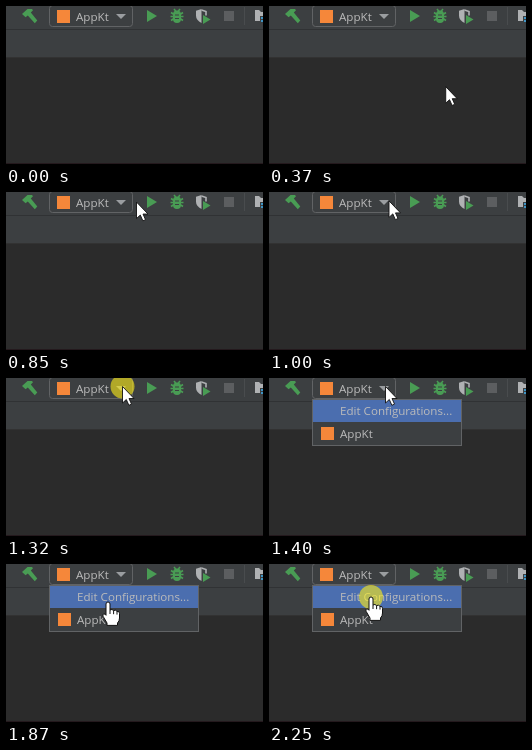
Write an HTML page that moves like this. It is 257x158 px and loops after 2.41 s.

```html
<!DOCTYPE html>
<html lang="en">
<head>
<meta charset="utf-8">
<title>Run configuration menu</title>
<style>
  html, body { margin: 0; width: 100%; height: 100%; overflow: hidden; background: #2b2b2b; }
  svg { display: block; width: 100vw; height: 100vh; }
  text { font: 11.6px "Open Sans", "Noto Sans", sans-serif; fill: #bbb; }
  .green { fill: #499c54; }
  .legs { fill: none; stroke: #499c54; stroke-width: 1.6; }
  .box { fill: #3c3f41; stroke: #616365; }
  .icon { fill: #f5873a; }
  .pointer { fill: #fff; stroke: #111; stroke-linejoin: round; }
</style>
</head>
<body>
<svg viewBox="0 0 257 158" preserveAspectRatio="none">
  <!-- window -->
  <rect width="257" height="158" fill="#2b2b2b"/>
  <rect width="257" height="51" fill="#3c3f41"/>
  <rect y="23" width="257" height="1" fill="#303234"/>
  <rect y="51" width="257" height="1" fill="#323232"/>
  <rect y="157" width="257" height="1" fill="#24191d"/>

  <!-- build -->
  <path class="green" d="M16 8 21.5 3H26L27 4.2 24.8 6.4 31.3 14.6 28.8 17.2 21.8 9.4 19.6 11.2Z"/>

  <!-- configuration box -->
  <rect class="box" x="43.5" y="-.5" width="83" height="21" rx="3"/>
  <rect class="icon" x="51" y="4" width="13" height="13"/>
  <text x="70" y="15">AppKt</text>
  <path d="M110 8h10l-5 5Z" fill="#9a9da0"/>

  <!-- run, debug, coverage, stop -->
  <rect id="hover" x="134" y="-2" width="22" height="23" rx="3" fill="#4c5052"/>
  <path class="green" d="M141 4 151 10 141 16Z"/>
  <path class="legs" d="M168 3 170 5.5M174 3 172 5.5M165 6.5 177 14.5M177 6.5 165 14.5M164.5 10.5h13"/>
  <rect class="green" x="167" y="4.5" width="8" height="12.5" rx="4"/>
  <path d="M169 9h4M169 12.5h4" stroke="#3c3f41" stroke-width="1.2"/>
  <path d="M195.5 3 190 4.8v5q0 4.6 5.5 7.2Z" fill="#afb1b3"/>
  <path d="M195.5 4 200 5.5v4" fill="none" stroke="#afb1b3" stroke-width="1.6"/>
  <path class="green" d="M197 9 204.5 13.5 197 18Z"/>
  <rect x="218" y="5" width="10" height="10" fill="#5c5e60"/>
  <path d="M238.5 1v18" stroke="#494c4e"/>
  <path d="M249 4h4l2 2h2v4h-3v5h-5Z" fill="#afb1b3"/>
  <path d="M255 11h2v2h-2ZM255 14h2v2h-2Z" fill="#3f94c4"/>

  <!-- drop-down -->
  <g id="menu">
    <rect class="box" x="43.5" y="21.5" width="149" height="46"/>
    <rect x="44" y="22" width="148" height="22" fill="#4b6eaf"/>
    <text x="71" y="37">Edit Configurations...</text>
    <rect class="icon" x="52" y="49" width="13" height="13"/>
    <text x="71" y="60">AppKt</text>
  </g>

  <g id="mouse">
    <circle id="click" r="12" fill="#ffee18" fill-opacity=".6"/>
    <path id="arrow" class="pointer" stroke-width=".9" d="M0 0V16.5L3.8 13 6.4 18.8 9 17.6 6.5 12H11.5Z"/>
    <g id="hand" class="pointer">
      <path d="M-2 2a2 2 0 0 1 4 0V8q2-1.4 3.6.6 2-1.2 3.4.8 2.5-.6 2.5 2V16q0 3-2 5v2.4H-1V21L-4.8 14.5q-1-2 .6-2.6 1.2-.2 2.2 1.4Z"/>
      <path fill="none" d="M2 8v4M5.6 8.6v3.6M9 9.6v3"/>
    </g>
  </g>
</svg>
<script>
  const LOOP = 2410, TICK = 76, MENU_OPEN = 1400;
  const ENTRY = { x: 194, y: 122 };

  // Each move eases out to its goal in whole ticks.
  const MOVES = [
    { at: 220, ticks: 7, power: 1.4, x: 148, y: 12 },
    { at: 770, ticks: 6, power: 2, x: 116.5, y: 8.5 },
    { at: 1630, ticks: 4, power: 1.5, x: 102, y: 38 },
    { at: 2090, ticks: 1, power: 1, x: 102, y: 33 }
  ];

  const [hover, menu, mouse, click, arrow, hand] =
    ["hover", "menu", "mouse", "click", "arrow", "hand"].map(id => document.getElementById(id));
  const show = (node, on) => node.setAttribute("visibility", on ? "visible" : "hidden");

  function pointerAt(t) {
    let { x, y } = ENTRY;
    for (const move of MOVES) {
      if (t < move.at) break;
      const done = Math.min(1, (Math.floor((t - move.at) / TICK) + 1) / move.ticks);
      const eased = 1 - (1 - done) ** move.power;
      x += (move.x - x) * eased;
      y += (move.y - y) * eased;
    }
    return { x, y };
  }

  function draw(t) {
    const { x, y } = pointerAt(t);
    const inside = t >= MOVES[0].at;
    const open = t >= MENU_OPEN;
    const overMenu = open && y > 22;
    mouse.setAttribute("transform", `translate(${x} ${y})`);
    show(arrow, inside && !overMenu);
    show(hand, overMenu);
    show(click, t >= 1320 && !open || t >= 2250);
    show(hover, x >= 134 && x < 156 && y < 22);
    show(menu, open);
  }

  const start = performance.now();
  function tick() {
    draw((performance.now() - start) % LOOP);
    requestAnimationFrame(tick);
  }
  tick();
</script>
</body>
</html>
```
